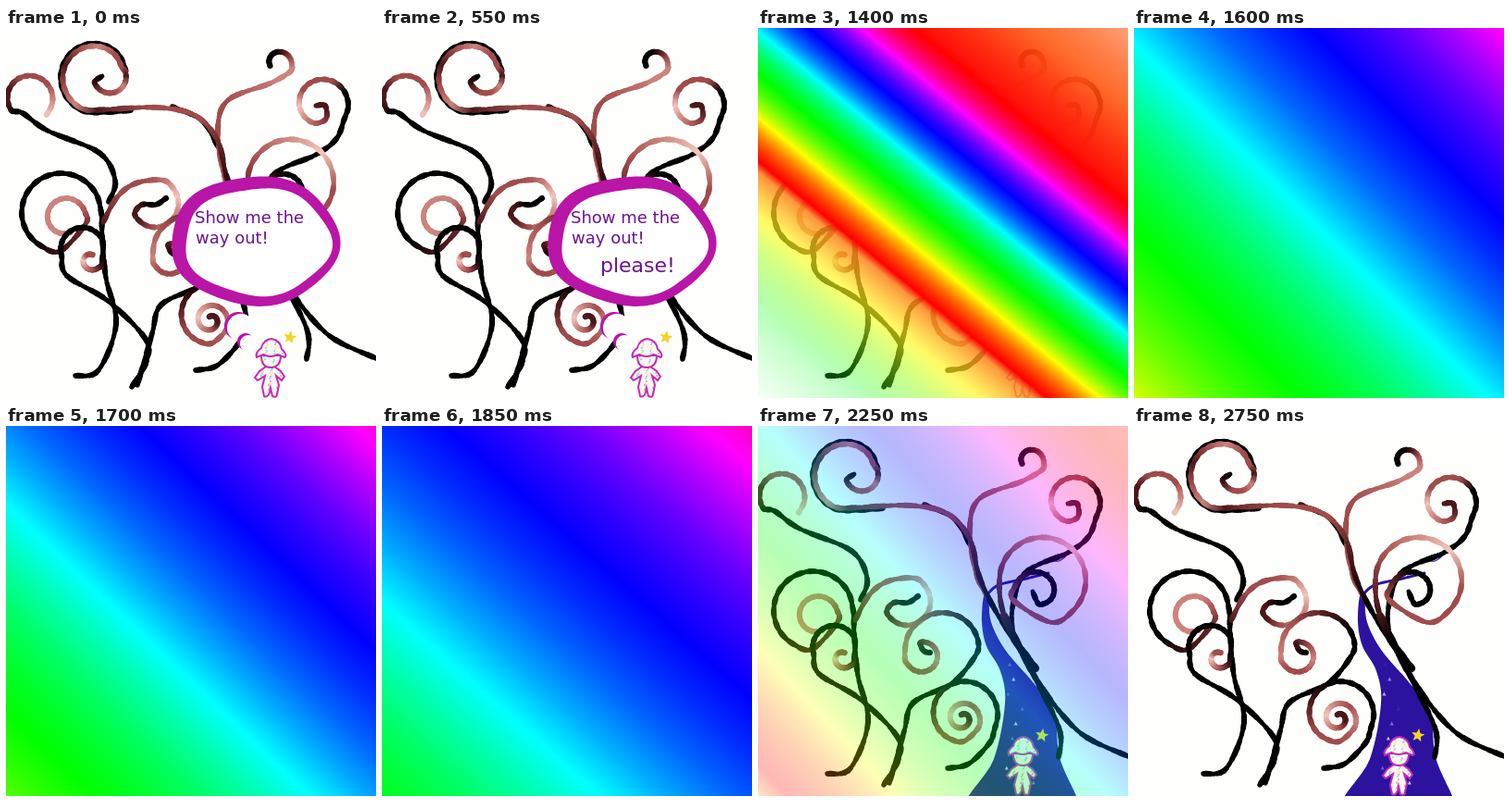
Write an HTML page with a canvas that moves like this. It is 400 px wide and 400 px high and loops after 2.8 s.

```html
<!DOCTYPE html>
<html lang="en">
<head>
<meta charset="utf-8">
<title>Show me the way out</title>
<style>
html, body { margin: 0; width: 100%; height: 100%; overflow: hidden; background: #fefffd; }
canvas { display: block; width: 400px; height: 400px; }
</style>
</head>
<body>
<canvas id="stage" width="400" height="400"></canvas>
<script>
const stage = document.getElementById('stage').getContext('2d');
const LOOP = 2800, STEP = 50, TURN = Math.PI * 2;
const PAPER = '#fefffd', MAGENTA = '#b915a6', NIGHT = '#2d12a0';
const mix = (a, b, k) => a + (b - a) * k;

// "x,y" is a point; "@x,y,r0,r1,from,turns" is a curl, angles in turns clockwise from the right
function points(text) {
  return text.split(' ').flatMap(word => {
    if (word[0] !== '@') return [word.split(',').map(Number)];
    const [x, y, r0, r1, from, turns] = word.slice(1).split(',').map(Number);
    const n = Math.ceil(Math.abs(turns) * 11);
    return Array.from({ length: n + 1 }, (_, i) => {
      const a = (from + turns * i / n) * TURN, r = mix(r0, r1, i / n);
      return [x + r * Math.cos(a), y + r * Math.sin(a)];
    });
  });
}

// Catmull-Rom samples through the points
function spline(text, closed = false, n = 8) {
  const pts = points(text), len = pts.length, out = [];
  const at = i => pts[closed ? (i + len) % len : Math.max(0, Math.min(len - 1, i))];
  for (let i = 0; i < (closed ? len : len - 1); i++) {
    const [a, b, c, d] = [at(i - 1), at(i), at(i + 1), at(i + 2)];
    for (let j = 0; j < n; j++) {
      const u = j / n;
      out.push([0, 1].map(k => b[k] + u / 2 * (c[k] - a[k] +
        u * (2 * a[k] - 5 * b[k] + 4 * c[k] - d[k] + u * (3 * (b[k] - c[k]) + d[k] - a[k])))));
    }
  }
  if (!closed) out.push(at(len - 1));
  return out;
}

function shape(ctx, pts, fill) {
  ctx.beginPath();
  pts.forEach(p => ctx.lineTo(...p));
  ctx.closePath();
  ctx.fillStyle = fill;
  ctx.fill();
}

// Ellipse with a lobed edge
function cloud(ctx, x, y, rx, ry, lobe, fill) {
  shape(ctx, Array.from({ length: 120 }, (_, i) => {
    const a = i / 120 * TURN, k = 1 + lobe * Math.sin(5 * a + 1);
    return [x + rx * k * Math.cos(a), y + ry * k * Math.sin(a)];
  }), fill);
}

// Brush tones: black, dark, brown, pink, light
const tones = { k: [0, 0, 0], d: [75, 25, 28], b: [160, 76, 76], p: [204, 132, 126], l: [242, 200, 190] };

function brush(ctx, text, colours, width = 5.4) {
  const pts = spline(text), last = pts.length - 1;
  ctx.lineCap = 'round';
  for (let i = 0; i < last; i++) {
    const at = i / last * (colours.length - 1), k = Math.floor(at);
    const a = tones[colours[k]], b = tones[colours[k + 1]];
    ctx.strokeStyle = `rgb(${a.map((v, c) => Math.round(mix(v, b[c], at - k)))})`;
    ctx.lineWidth = width + 0.8 * Math.sin(i * 1.3);
    ctx.beginPath();
    ctx.moveTo(...pts[i]);
    ctx.lineTo(...pts[i + 1]);
    ctx.stroke();
  }
}

const trees = document.createElement('canvas');
trees.width = trees.height = 400;
[
  ['229,128 212,100 180,85', 'kd'],
  ['135,89 108,91 @97,52,40,33,.3,.67', 'kk'],
  ['111,188 118,165 101,135 45,111 18,92 @25,76,23,26,.4,.72', 'kkkkkddbbbpl'],
  ['75,376 100,370 119,320 108,270 104,225 @59,200,44,41,0,-.75 @64,205,23,17,.05,-.85', 'kkkkkkkkdbppppp'],
  ['136,388 152,360 150,335 110,295 66,268 @83,239,24,23,.45,.5 @92,251,12,6,.05,.75', 'kkkkkkkkdbplbb'],
  ['105,210 120,183 140,168 @160,191,28,23,-.2,.63 147,191 162,191 173,184', 'dbbplppbddkk'],
  ['142,386 158,330 168,299 210,278 234,250 @202,242,37,44,-.03,-.5 @178,248,19,14,.42,-.7 179,243 186,245', 'kkkkdbpbbpbdk'],
  ['205,370 228,365 250,343 @222,311,38,30,.08,-.83 @221,316,20,4,.1,-1.4', 'kkkkkdbbpbplpbddd'],
  ['250,187 236,160 229,110 240,78 285,60 @294,38,16,9,.1,-.65', 'bbbppbdkkk'],
  ['300,262 264,212 240,165 229,122 205,95 165,86 110,88 @97,52,38,30,.3,.65 @112,53,18,17,-.05,.5 104,52', 'kkdbbdpbdbpbbdpbbdk'],
  ['400,357 350,333 312,290 284,240 274,208 288,160 335,137 357,120 @341,82,30,22,.1,-.8 346,98 345,84 335,84', 'kkkkkkkkkbbblpbdd'],
  ['325,358 325,325 290,255 266,205 @308,167,47,46,.5,.72 @303,180,28,12,.45,.8 297,179', 'kkdbplbbbdkkkkk'],
  ['266,205 280,235 300,262', 'dkk', 8]
].forEach(branch => brush(trees.getContext('2d'), ...branch));

function path(ctx, t) {
  shape(ctx, spline('244,184 249,184 252,212 268,243 298,278 320,310 326,358 344,400 350,420 226,420 255,360 267,300 262,265 247,238 242,212', true), NIGHT);
  ctx.strokeStyle = NIGHT;
  ctx.lineCap = 'round';
  for (const [line, width] of [['246,184 260,172 290,165 314,159', 3], ['335,136 315,143 325,146 336,138', 1.2]]) {
    ctx.lineWidth = width;
    ctx.beginPath();
    spline(line).forEach(p => ctx.lineTo(...p));
    ctx.stroke();
  }
  for (let i = 0; i < 9; i++) {
    const y = 258 + 16 * i, x = 272 + 2.2 * i + 3 * i * Math.sin(i * 2.4);
    ctx.globalAlpha = 0.55 + 0.45 * Math.sin(t / 45 + i * 2);
    shape(ctx, [[x, y - 2.5], [x + 2, y + 1.5], [x - 2, y + 1.5]], '#b9c8ff');
  }
  ctx.globalAlpha = 1;
}

const body = new Path2D('M281 366 L274 371 L269 378 L272 381 L280 376 L277 388 L279 398 Q283 400 285 394 L286 389 L288 398 Q293 400 293 396 L295 386 L292 376 L298 381 L301 377 L297 371 L290 366 Z');
const head = new Path2D('M276 354 Q276 367 286 367 Q297 367 297 354 Z');
const hat = new Path2D('M271 356 Q269 351 276 346 Q278 337 287 336 Q297 338 298 347 Q305 354 301 356 L294 353 Q286 357 278 353 Z');
const flecks = ['#fff27a', '#8fe6ef', '#f6a5e2', '#b9a7f0'];

function girl(ctx) {
  for (const part of [body, head, hat]) {
    ctx.fillStyle = '#fdf6fb';
    ctx.fill(part);
    ctx.save();
    ctx.clip(part);
    for (let i = 0; i < 80; i++) {
      ctx.fillStyle = flecks[i * i % 7 % 4];
      ctx.fillRect(271 + i * 7 % 29, 337 + i * 17 % 61, 2, 2);
    }
    ctx.restore();
    ctx.strokeStyle = '#c32cb4';
    ctx.lineWidth = 2;
    ctx.stroke(part);
  }
  shape(ctx, Array.from({ length: 10 }, (_, i) => {
    const a = i * TURN / 10 - 1.4, r = i % 2 ? 3.4 : 7.5;
    return [307 + r * Math.cos(a), 334.5 + r * Math.sin(a)];
  }), '#f0d42c');
}

function bubble(ctx, t) {
  for (const [x, y, r] of [[251, 322, 15], [259, 339, 9]]) {
    cloud(ctx, x, y, r, r, 0, MAGENTA);
    cloud(ctx, x + 3, y + 2, r, r, 0, PAPER);
  }
  cloud(ctx, 269, 230, 91, 70, 0.02, MAGENTA);
  cloud(ctx, 272, 231, 79, 58, 0.03, '#fff');
  ctx.fillStyle = '#6a1494';
  ctx.font = '18px "DejaVu Sans", sans-serif';
  ctx.fillText('Show me the', 204, 211);
  ctx.fillText('way out!', 205, 233);
  if (t >= 550) {
    ctx.font = '22px "DejaVu Sans", sans-serif';
    ctx.fillText('please!', 236, 264);
  }
}

// Colour at position h: hues from 0 to 6, a soft glow outside
function bandColour(h, glow) {
  if (h < 0) return `hsla(${Math.min(125, 20 - 30 * h)}, 100%, 55%, ${0.9 * glow * (1 + h / 6) ** 1.3})`;
  if (h <= 6) return `hsl(${60 * (h - 0.1 * Math.sin(Math.PI * h))}, 100%, 50%)`;
  return `hsla(${Math.min(18, 8 * (h - 6))}, 100%, 52%, ${glow * Math.max(0, 1 - ((h - 6) / 6) ** 2)})`;
}

// time, slope, height of the lower red at the left edge, spacing per hue
const poses = [
  [850, 1.1, -55, 1], [1150, 1.09, -25, 11], [1400, 0.82, 144, 47],
  [1600, 1, 630, 205], [1850, 0.89, 940, 250], [2100, 1.08, 365, 125]
];

function rainbow(ctx, t) {
  const next = poses.findIndex(p => p[0] > t);
  const b = poses.at(next), a = next < 0 ? b : poses[next - 1];
  const k = a === b ? 0 : (t - a[0]) / (b[0] - a[0]);
  const [, slope, start, gap] = a.map((v, i) => mix(v, b[i], k));
  const point = h => {
    const v = (start - gap * h) / (1 + slope * slope);
    return [-slope * v, v];
  };
  const fill = ctx.createLinearGradient(...point(-6), ...point(12));
  const glow = Math.min(1, 0.4 + gap / 78);
  for (let h = -6; h <= 12; h += 0.25) fill.addColorStop((h + 6) / 18, bandColour(h, glow));
  ctx.globalAlpha = Math.min(1, 1 - (t - 1900) / 550) ** 1.25;
  ctx.fillStyle = fill;
  ctx.fillRect(0, 0, 400, 400);
  ctx.globalAlpha = 1;
}

function draw(now) {
  const t = Math.floor(now % LOOP / STEP) * STEP;
  stage.fillStyle = PAPER;
  stage.fillRect(0, 0, 400, 400);
  if (t >= 1900) path(stage, t);
  stage.drawImage(trees, 0, 0);
  if (t < 850) bubble(stage, t);
  girl(stage);
  if (t >= 850 && t < 2450) rainbow(stage, t);
}

let begin;
function tick(now) {
  begin ??= now;
  draw(now - begin);
  requestAnimationFrame(tick);
}
draw(0);
requestAnimationFrame(tick);
</script>
</body>
</html>
```
